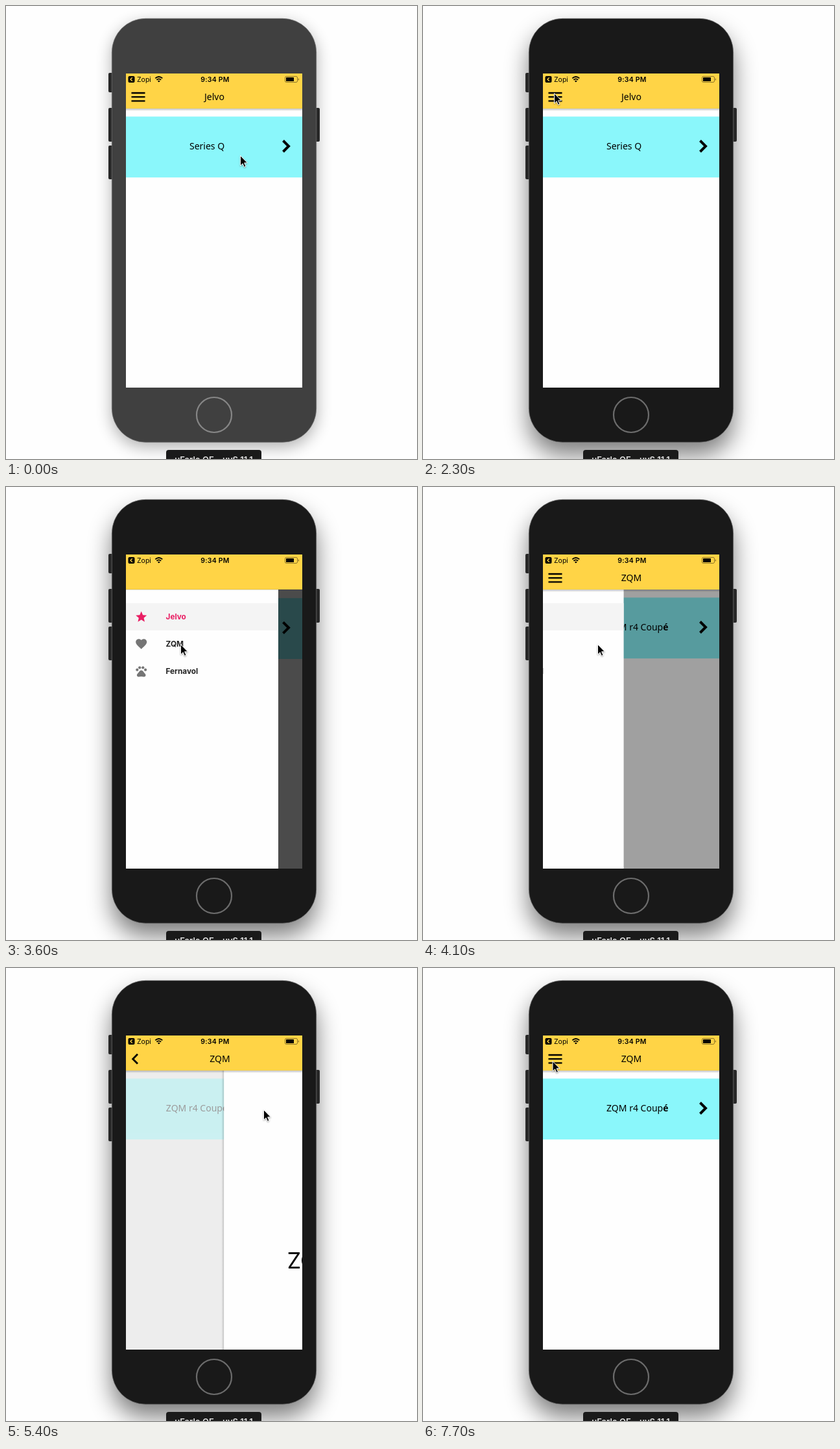
Write an HTML page that moves like this. It is 634 by 698 pixels and loops after 8 s.

```html
<!DOCTYPE html>
<html lang="en">
<head>
<meta charset="utf-8">
<title>Drawer navigation demo</title>
<style>
  html, body { margin: 0; width: 100%; height: 100%; overflow: hidden; background: #fefefe; }
  svg { display: block; width: 100%; height: 100%; }
  .ui { font: 500 14px "Noto Sans", sans-serif; }
  .sys { font: 400 10.5px Inter, sans-serif; }
  .label { font: 700 11.8px Inter, sans-serif; }
  .line { fill: none; stroke: #000; }
</style>
</head>
<body>
<svg viewBox="0 0 634 698" preserveAspectRatio="none">
  <defs>
    <clipPath id="screen"><rect x="185" y="104" width="272" height="484"/></clipPath>
    <filter id="soft" x="-40%" y="-40%" width="180%" height="180%"><feGaussianBlur stdDeviation="12"/></filter>
    <filter id="wide" x="-40%" y="-40%" width="180%" height="180%"><feGaussianBlur stdDeviation="18"/></filter>
    <linearGradient id="down" x2="0" y2="1">
      <stop stop-opacity=".24"/><stop offset="1" stop-opacity="0"/>
    </linearGradient>
    <linearGradient id="left">
      <stop stop-opacity="0"/><stop offset="1" stop-opacity=".18"/>
    </linearGradient>
  </defs>

  <rect width="634" height="698" fill="#fefefe"/>
  <rect id="shadowIdle" x="163" y="27" width="316" height="653" rx="52" opacity=".3" filter="url(#soft)"/>
  <rect id="shadowActive" x="163" y="39" width="316" height="653" rx="52" opacity=".5" filter="url(#wide)"/>

  <g fill="#272727">
    <rect x="158" y="103" width="8" height="30" rx="2"/>
    <rect x="158" y="157" width="8" height="52" rx="2"/>
    <rect x="158" y="215" width="8" height="52" rx="2"/>
    <rect x="476" y="157" width="8" height="52" rx="2"/>
  </g>
  <rect id="body" x="163.3" y="19.3" width="315.4" height="652.9" rx="52" stroke="#777" stroke-width=".7"/>
  <circle id="home" cx="321" cy="630" r="27" fill="none" stroke-width="2.2"/>

  <rect x="247" y="684" width="147" height="30" rx="4" fill="#1a1a1a"/>
  <text x="320.5" y="704.3" text-anchor="middle" fill="#e4e4e4" style="font:600 13px Inter,sans-serif">uFarlo QE – uvS 11.1</text>

  <g clip-path="url(#screen)">
    <rect x="185" y="104" width="272" height="484" fill="#fefefe"/>
    <rect id="dim" x="185" y="158" width="272" height="430" fill="#ededed"/>

    <g id="list">
      <g id="row">
        <rect x="185" y="170.4" width="272" height="93.8" fill="#8af7fb"/>
        <text id="item" class="ui" x="283" y="221"></text>
        <path class="line" d="M427.5 207.5l8.5 8.5-8.5 8.5" stroke-width="4"/>
      </g>
    </g>

    <g id="detail">
      <rect x="181" y="158" width="4" height="430" fill="url(#left)"/>
      <rect x="185" y="158" width="272" height="430" fill="#fefefe"/>
      <text x="321" y="463" text-anchor="middle" style="font:400 34px Inter,sans-serif">ZQM</text>
    </g>

    <rect id="scrim" x="185" y="158" width="272" height="430"/>
    <g id="drawer">
      <rect x="185" y="158" width="235" height="430" fill="#fefefe"/>
      <rect x="185" y="179" width="235" height="42" fill="#f4f4f4"/>
      <g fill="#e91e63">
        <path transform="translate(198.5 189.8) scale(.85)" d="M12 17.27L18.18 21l-1.64-7.03L22 9.24l-7.19-.61L12 2 9.19 8.63 2 9.24l5.46 4.73L5.82 21z"/>
        <text class="label" x="246.5" y="204.2">Jelvo</text>
      </g>
      <g id="choice">
        <path transform="translate(198.5 231.6) scale(.85)" fill="#757575" d="M12 21.35C5.4 15.36 2 12.28 2 8.5 2 5.42 4.42 3 7.5 3c1.74 0 3.41.81 4.5 2.09C13.09 3.81 14.76 3 16.5 3 19.58 3 22 5.42 22 8.5c0 3.78-3.4 6.86-10 12.85z"/>
        <text class="label" x="246.5" y="246" fill="#222">ZQM</text>
      </g>
      <g transform="translate(198.5 273.6) scale(.85)" fill="#757575">
        <circle cx="4.5" cy="9.5" r="2.5"/><circle cx="9" cy="5.5" r="2.5"/>
        <circle cx="15" cy="5.5" r="2.5"/><circle cx="19.5" cy="9.5" r="2.5"/>
        <path d="M12 10.5c-2.6 0-3.6 2.2-5.3 4.3-1.5 1.5-3 2.9-2.7 4.8.9 4.1 5 1.9 8 1.9s7.1 2.2 8-1.9c.3-1.9-1.2-3.3-2.7-4.8-1.7-2.1-2.7-4.3-5.3-4.3z"/>
      </g>
      <text class="label" x="246.5" y="287.8" fill="#222">Fernavol</text>
    </g>

    <rect id="headShade" x="185" y="158" width="272" height="4" fill="url(#down)"/>
    <rect x="185" y="104" width="272" height="54" fill="#ffd446"/>
    <rect id="hairline" x="185" y="157.7" width="272" height=".7" opacity=".25"/>
    <text id="title" class="ui" y="145" text-anchor="middle"></text>
    <path id="menu" class="line" d="M193.5 134h21M193.5 140.2h21M193.5 146.4h21" stroke-width="2.3"/>
    <path id="back" class="line" d="M203 132.8l-7.3 7.4 7.3 7.4" stroke-width="2.8"/>

    <rect x="188.5" y="108" width="10" height="10" rx="2"/>
    <path d="M194.8 110.2l-2.8 2.8 2.8 2.8" fill="none" stroke="#ffd446" stroke-width="1.4"/>
    <text class="sys" x="202" y="116.6">Zopi</text>
    <g class="line" stroke-width="1.8">
      <path d="M230.3 111.4q5.5-4.8 11 0M232.4 113.8q3.4-2.9 6.8 0"/>
    </g>
    <path d="M235.8 117.6l-2-2.1q2-1.5 4 0z"/>
    <text class="sys" x="322.5" y="116.6" text-anchor="middle" style="font-weight:600" letter-spacing=".25">9:34 PM</text>
    <rect x="430.5" y="108.5" width="19" height="9" rx="2" fill="none" stroke="#000" stroke-opacity=".5" stroke-width=".9"/>
    <rect x="432" y="110" width="12" height="6" rx=".6"/>
    <rect x="450.8" y="111.4" width="1.1" height="3.2" rx=".5" opacity=".5"/>
  </g>

  <path id="cursor" d="M0 0V15.6L3.6 12.3 6 17.8 8.5 16.7 6.1 11.3H10.9Z" stroke="#fff" stroke-width="1" style="filter:drop-shadow(0 1px 1px rgba(0,0,0,.35))"/>
</svg>
<script>
const LOOP = 8000, STEP = 100;
const DRAWER_W = 235, SCREEN_W = 272;
const ACTIVE = 2200, OPEN = 2320, PRESS = 3900, CLOSE = 4020;
const ROW_PRESS = 5200, PUSH = 5333, POP = 6880;

const $ = id => document.getElementById(id);
const clamp = x => Math.max(0, Math.min(1, x));
const smooth = u => u * u * (3 - 2 * u);
const set = (id, name, value) => $(id).setAttribute(name, value);
const show = (id, on) => set(id, 'visibility', on ? 'visible' : 'hidden');
const slide = (id, x, y = 0) => set(id, 'transform', `translate(${x} ${y})`);

// Critically damped spring, 0 to 1
const spring = ms => {
  const x = Math.max(0, ms) * 0.0198;
  return 1 - (1 + x) * Math.exp(-x);
};

// Card transition: cubic-bezier(.2833, .99, .3183, .99) over 500 ms
const bez = (a, b, s) => 3 * (1 - s) ** 2 * s * a + 3 * (1 - s) * s * s * b + s ** 3;
function card(ms) {
  const u = clamp(ms / 500);
  if (u === 0 || u === 1) return u;
  let lo = 0, hi = 1;
  for (let i = 0; i < 24; i++) {
    const mid = (lo + hi) / 2;
    if (bez(0.2833, 0.3183, mid) < u) lo = mid; else hi = mid;
  }
  return bez(0.99, 0.99, lo);
}

// Pointer moves: start, end, x, y, upward bow
const start = [361.5, 230.5];
const moves = [
  [30, 200, 379, 226, 0],
  [330, 600, 397.5, 222, 0],
  [1130, 1800, 202.5, 134.5, 0],
  [3040, 3600, 269.5, 242.5, 0],
  [4400, 4900, 397.5, 218.5, 0],
  [5700, 6480, 200, 143.5, 9]
];

function pointer(t) {
  let [x, y] = start;
  for (const [from, to, nx, ny, bow] of moves) {
    if (t < from) break;
    const e = smooth(clamp((t - from) / (to - from)));
    x += (nx - x) * e;
    y += (ny - y) * e - bow * Math.sin(Math.PI * e);
  }
  return [x, y];
}

function draw(t) {
  const active = t >= ACTIVE;
  show('shadowIdle', !active);
  show('shadowActive', active);
  set('body', 'fill', active ? '#191919' : '#404040');
  set('home', 'stroke', active ? '#6c6c6c' : '#868686');

  const second = t >= CLOSE;
  const drawerRoute = t >= OPEN && !second;
  const detailRoute = t >= PUSH && t < POP;

  $('title').textContent = second ? 'ZQM' : 'Jelvo';
  set('title', 'x', detailRoute ? 330 : 321.5);
  show('title', !drawerRoute);
  show('menu', !drawerRoute && !detailRoute);
  show('back', detailRoute);
  show('headShade', !drawerRoute);
  show('hairline', drawerRoute);
  $('item').innerHTML = second ? 'ZQM r4 Coup<tspan font-weight="700">é</tspan>' : 'Series Q';

  const open = spring(t - OPEN) * (1 - spring(t - CLOSE));
  slide('drawer', (open - 1) * DRAWER_W);
  show('drawer', open > 0.002);
  set('scrim', 'opacity', 0.7 * open);
  set('choice', 'opacity', t >= PRESS ? 0.25 : 1);

  const p = card(t - PUSH) - card(t - POP);
  const pressed = t < POP ? clamp((t - ROW_PRESS + 100) / 200) : 0;
  slide('list', -0.3 * SCREEN_W * p, drawerRoute ? 0.8 : 0);
  set('row', 'opacity', 1 - 0.66 * pressed);
  set('dim', 'opacity', clamp(2.3 * p));
  slide('detail', SCREEN_W * (1 - p));
  show('detail', p > 0);

  slide('cursor', ...pointer(t));
}

function tick() {
  const t = performance.now() % LOOP;
  draw(Math.floor(t / STEP) * STEP);
  requestAnimationFrame(tick);
}
tick();
</script>
</body>
</html>
```
